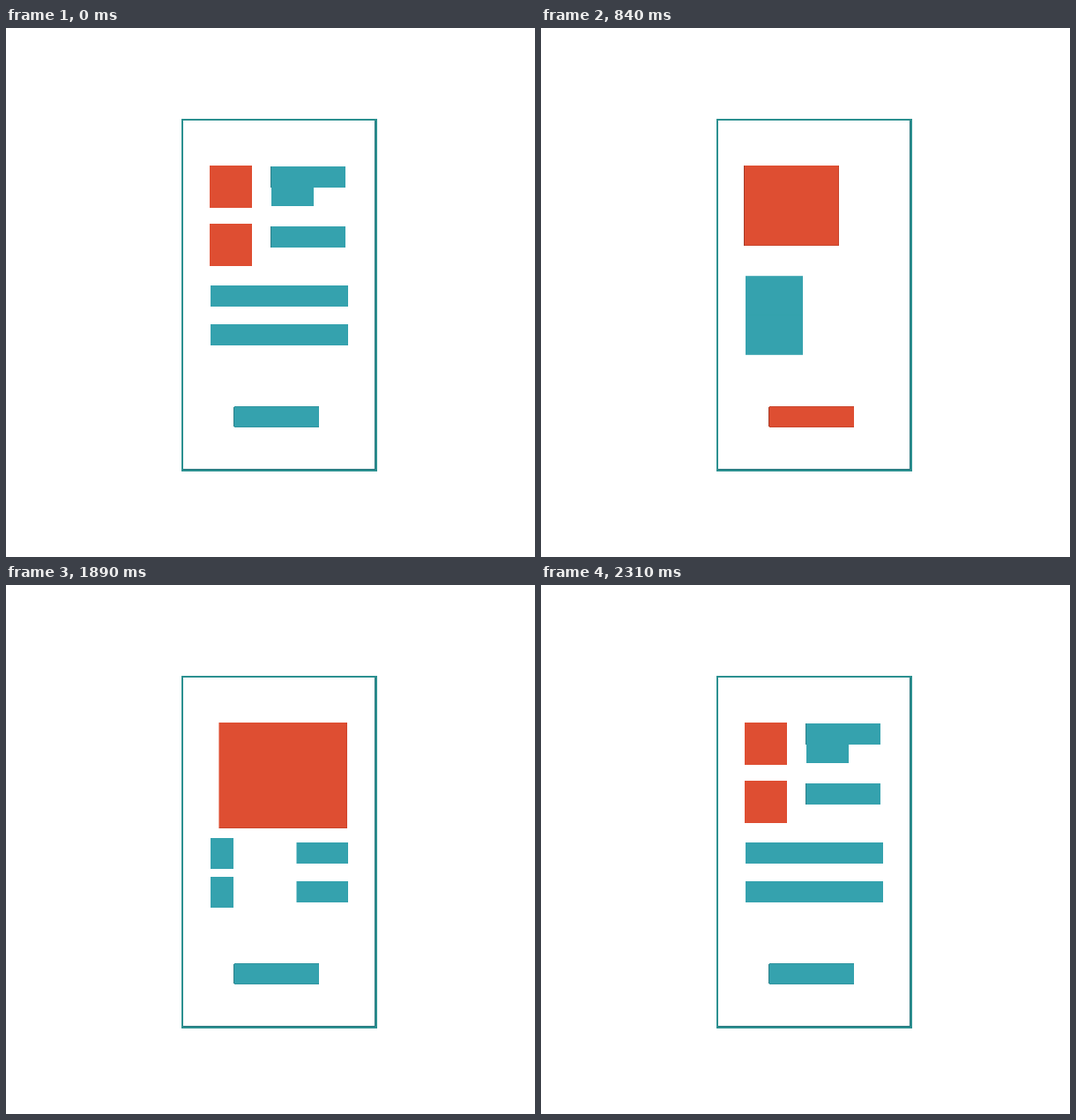
Recreate the animation shown at these times as an HTML page. Size 600 by 600 pixels, loop 2430 ms.

```html
<!DOCTYPE html>
<html lang="en">
<head>
<meta charset="utf-8">
<title>Layout switch</title>
<style>
html, body { margin: 0; width: 100%; height: 100%; overflow: hidden; background: #fff; }

/* Each part: x, y, w, h give its box; sy is the vertical stretch it grows from. */
i {
  --teal: #35a2ae; --red: #de4e32; --sy: 1.5;
  position: absolute; box-sizing: border-box;
  left: calc(var(--x) * 1px); top: calc(var(--y) * 1px);
  width: calc(var(--w) * 1px); height: calc(var(--h) * 1px);
  background: var(--teal);
  animation: 2430ms step-end infinite;
}
.card {
  --x: 199; --y: 103; --w: 222; --h: 400;
  background: none; border: 2px solid #2c9090;
  box-shadow: inset -1px -1px #27757d;
}
.square { --w: 48; --h: 48; --sy: .58; background: var(--red); animation-name: item; }
.label { --w: 84; --h: 24; --edge: -1px 0 #2a7f88; animation-name: item; }
.note { --w: 48; --h: 21; animation-name: note; }
.bar { --x: 232; --w: 156; --h: 24; }
.first { --sy: 1.55; animation-name: first; }
.second { --sy: 2.54; animation-name: second; }
.hero { --x: 231; --y: 156; --w: 156; --h: 120; background: var(--red); animation-name: hero; }
.button { --x: 259; --y: 430; --w: 96; --h: 22; animation-name: button; }

/* Parts leave towards their right side and grow from their left side. */
@keyframes item {
  0% { transform: none; transform-origin: right; box-shadow: var(--edge, none); }
  27.16% { transform: scale(1); transform-origin: right; box-shadow: none; animation-timing-function: steps(6, start); }
  34.56% { transform: scale(0, 1); transform-origin: right; box-shadow: none; }
  83.95% { transform: scale(0, var(--sy)); transform-origin: left; box-shadow: none; animation-timing-function: steps(6, start); }
  91.35% { transform: scale(1); transform-origin: left; box-shadow: none; }
  91.36%, 100% { transform: none; transform-origin: left; box-shadow: var(--edge, none); }
}
@keyframes note {
  0% { transform: none; transform-origin: right; }
  27.16% { transform: scale(1); transform-origin: right; animation-timing-function: steps(6, start); }
  34.56% { transform: scale(0, 1); transform-origin: right; }
  91.35% { transform: scale(0, var(--sy)); transform-origin: left; animation-timing-function: steps(4, start); }
  96.29%, 100% { transform: scale(1); transform-origin: left; }
}
@keyframes first {
  0% { transform: none; transform-origin: right; }
  27.16% { transform: scale(1); transform-origin: right; animation-timing-function: steps(6, start); }
  34.56% { transform: scale(0, 1); transform-origin: right; }
  77.77% { transform: scale(0, var(--sy)); transform-origin: left; animation-timing-function: steps(6, start); }
  85.18%, 100% { transform: scale(1); transform-origin: left; }
}
@keyframes second {
  0% { transform: scale(0); transform-origin: left; }
  29.62% { transform: scale(0, var(--sy)); transform-origin: left; animation-timing-function: steps(12, start); }
  44.44% { transform: scale(1); transform-origin: left; }
  72.83% { transform: scale(1); transform-origin: right; animation-timing-function: steps(8, start); }
  82.71%, 100% { transform: scale(0, 1); transform-origin: right; }
}
@keyframes hero {
  0% { visibility: hidden; width: 48px; height: 48px; transform: none; transform-origin: right; box-shadow: none; }
  27.16% { visibility: visible; width: 48px; height: 48px; box-shadow: -1px 0 #a63a26, inset -1px -1px #c8452c; animation-timing-function: steps(7, start); }
  35.8% { visibility: visible; width: 107px; height: 91px; box-shadow: -1px 0 #a63a26, inset -1px -1px #c8452c; animation-timing-function: steps(7, start); }
  44.44% { visibility: visible; width: 156px; height: 120px; transform: none; box-shadow: -1px 0 #a63a26, inset -1px -1px #c8452c; }
  77.77% { transform: scaleX(.933); box-shadow: inset -1px -1px #c8452c; }
  79.01% { transform: scaleX(.75); }
  80.24% { transform: scaleX(.5); }
  81.48% { transform: scaleX(.25); }
  82.71% { transform: scaleX(.067); }
  83.95%, 100% { visibility: hidden; width: 156px; height: 120px; transform: scaleX(0); transform-origin: right; box-shadow: none; }
}
@keyframes button {
  0% { transform: none; background: var(--teal); box-shadow: -1px 0 #2a7f88, 0 -1px #2f949f, 0 1px #2f949f; }
  25.92% { transform: scaleX(1); background: var(--teal); box-shadow: none; animation-timing-function: steps(4, start); }
  30.86% { transform: scaleX(0); background: var(--red); box-shadow: none; animation-timing-function: steps(4, start); }
  34.56% { box-shadow: -1px 0 #a63a26, 0 -1px #c8452c, 0 1px #c8452c; }
  35.8% { transform: scaleX(1); background: var(--red); }
  69.13% { transform: scaleX(1); background: var(--red); box-shadow: none; animation-timing-function: steps(4, start); }
  74.07% { transform: scaleX(0); background: var(--teal); box-shadow: none; animation-timing-function: steps(4, start); }
  77.77% { box-shadow: -1px 0 #2a7f88, 0 -1px #2f949f, 0 1px #2f949f; }
  79.01%, 100% { transform: scaleX(1); background: var(--teal); box-shadow: -1px 0 #2a7f88, 0 -1px #2f949f, 0 1px #2f949f; }
}
</style>
</head>
<body>
<i class="card"></i>
<i class="square" style="--x:231;--y:156"></i>
<i class="square" style="--x:231;--y:222"></i>
<i class="label" style="--x:301;--y:157"></i>
<i class="note" style="--x:301;--y:181"></i>
<i class="label" style="--x:301;--y:225"></i>
<i class="bar first" style="--y:292"></i>
<i class="bar first" style="--y:336"></i>
<i class="bar second" style="--y:292"></i>
<i class="bar second" style="--y:336"></i>
<i class="hero"></i>
<i class="button"></i>
</body>
</html>
```
